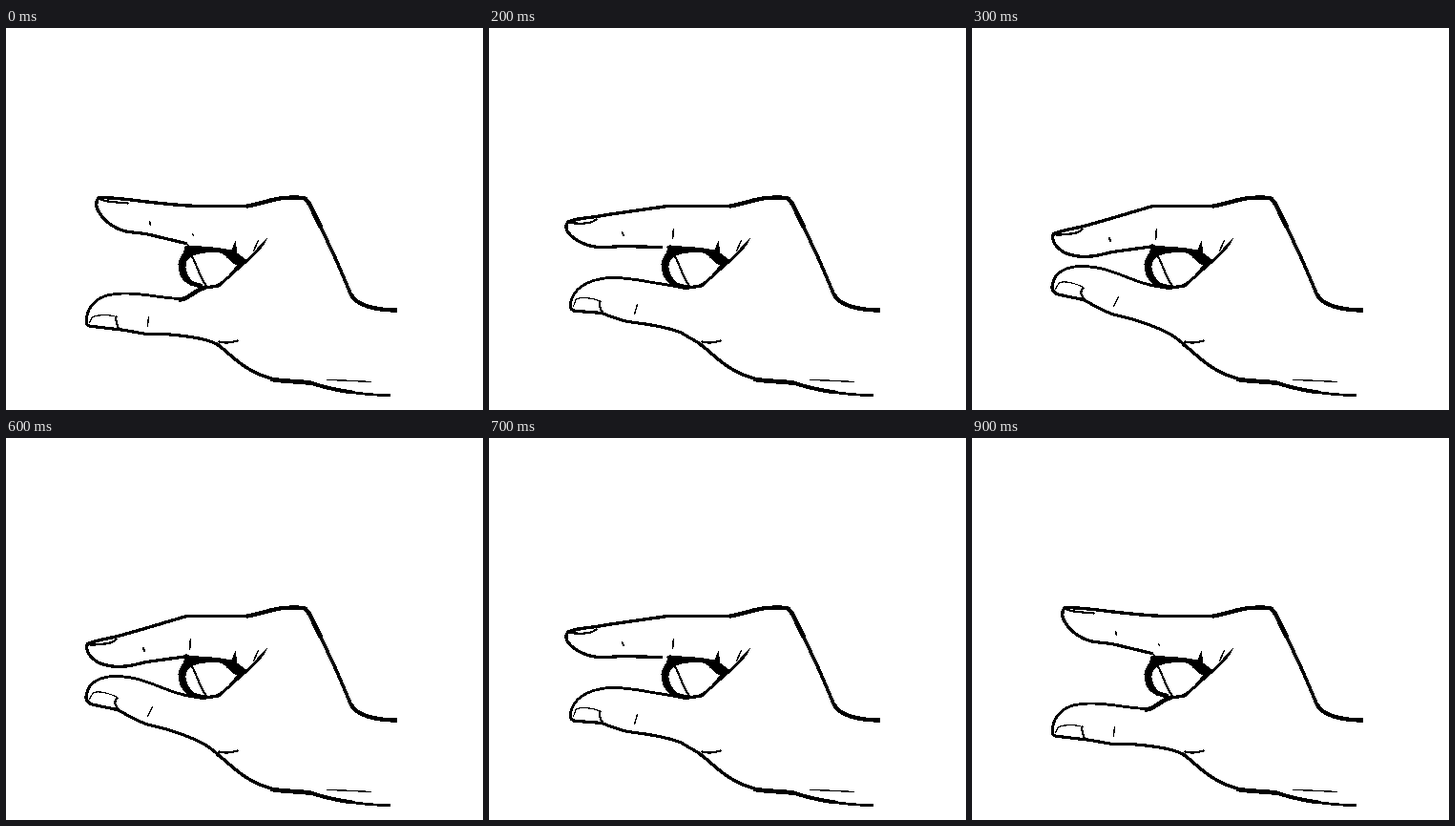
Recreate the animation shown at these times as an HTML page. Size 500 by 400 pixels, loop 1000 ms.

```html
<!DOCTYPE html>
<html lang="en">
<head>
<meta charset="utf-8">
<title>Pinching hand</title>
<style>
  html, body { margin: 0; width: 100%; height: 100%; overflow: hidden; background: #fff; }
  svg { display: block; }
  .line { fill: none; stroke: #000; stroke-linecap: round; stroke-linejoin: round; }
</style>
</head>
<body>
<svg width="500" height="400" viewBox="0 0 500 400" shape-rendering="crispEdges">
  <rect width="500" height="400" fill="#fff"/>
  <g transform="translate(.5 .5)">
    <!-- back of the hand and wrist -->
    <g class="line">
      <path stroke-width="3.400" d="M204 186.300L252 186"/>
      <path stroke-width="4.400" d="M252 186C266 184 276 179 290 177.500C299 177 307 176.500 313 178"/>
      <path stroke-width="4.600" d="M313 178.500C318 182 320 189 323 195L329 207"/>
      <path stroke-width="3.600" d="M329 207L345 241L357 269C360 276 361 281 367 285"/>
      <path stroke-width="4.400" stroke-linecap="butt" d="M361 278C366 290 387 295 409 295"/>
      <path stroke-width="3.500" d="M221 331C235 340 246 358 279 367"/>
      <path stroke-width="4.800" d="M279 367.500C292 370 306 369 320 371.500"/>
      <path stroke-width="4" d="M320 371.500C334 376 348 379 362 381"/>
      <path stroke-width="2.800" d="M362 381C376 383 390 384 401 384"/>
      <path stroke-width="1.400" d="M336 368L353 368.500L382 370"/>
      <path stroke-width="2.300" d="M223 328C230 330 236 329 242 327"/>
    </g>

    <!-- gap between the fingers -->
    <path d="M187 228C202 227 222 229 236 232L240 222L242 235L251 242C260 235 266 225 274 219C269 231 258 240 250 247L242 254L223 271C214 273 201 273 193 269C184 264 180 256 180 247C180 240 187 236 187 228Z"/>
    <path fill="#fff" d="M188 250C187 241 195 236 208 235C220 233 228 235 231 240L238 246L241 248C235 257 230 262 220 268L206 270C195 268 189 260 188 250Z"/>
    <path d="M228 235L238 236L250 244L244 248L238 245Z"/>
    <g class="line">
      <path stroke-width="2.200" d="M194 238C198 243 200 255 209 269"/>
      <path stroke-width="1.500" d="M264 222L259 233"/>
    </g>

    <g id="fingers" class="line"></g>
  </g>
</svg>
<script>
const widths = {
  top: 3.4, tip: 3.3, nail: 2.2, crease: 1.9, knuckle: 1.7,
  thumbTop: 2.9, thumbTip: 3.2, thumbNail: 1.2, nailSide: 2.2, thumbCrease: 1.4, web: 4.6
};

const open = {
  top: 'M97 177C107 177 116 178 127 179C150 182 168 184 190 185.5L206 186.3',
  tip: 'M97 177C92 182 94 188 98 194C104 203 115 211 128 213L146 215L188 225',
  nail: 'M99 179C104 182 118 182 127 183',
  crease: 'M150 202L151 206',
  knuckle: 'M195 215L196 217M190 226L192 230',
  thumbTop: 'M84 303C86 289 97 279 115 278C138 275 160 283 184 283L186 284',
  thumbTip: 'M84 303C83 310 85 312 90 312L116 315C127 316 138 319 148 320C170 319 198 323 212 327L222 331',
  thumbNail: 'M87 308L90 302C98 299 106 300 113 301',
  nailSide: 'M115 302C114 306 116 310 117 313',
  thumbCrease: 'M149 302L148 312',
  web: 'M184 257C187 264 194 268 203 269M182 284C192 283 195 275 209 271'
};

const half = {
  top: 'M82 203C86 200 96 199 112 197C135 193 160 190 187 186L206 186.3',
  tip: 'M82 203C78 208 82 215 89 220C99 227 111 230 124 229L138 228L180 229',
  nail: 'M84 203C92 205 106 205 112 200',
  crease: 'M139 214L141 217',
  knuckle: 'M193 210L192 220M186 229L190 227',
  thumbTop: 'M85 288C87 273 102 263 125 261C147 260 166 266 184 268L205 272',
  thumbTip: 'M85 288C84 294 87 296 92 296L118 298C130 303 141 307 152 308C170 310 186 313 200 318L222 331',
  thumbNail: 'M88 291L91 283C99 281 107 282 115 285',
  nailSide: 'M116 286C115 290 116 294 119 298',
  thumbCrease: 'M155 289L152 299',
  web: 'M184 257C187 264 194 269 203 270M205 271C206 271 208 271 209 271'
};

const near = {
  top: 'M85 215C91 212 104 210 117 207C146 199 168 192 189 186L206 186.3',
  tip: 'M85 215C82 222 88 230 97 235C107 239 121 240 134 237L147 234L190 228',
  nail: 'M88 216C97 216 113 215 115 210',
  crease: 'M143 219L145 223',
  knuckle: 'M193 210L192 221M188 226L192 229',
  thumbTop: 'M84 268C86 256 97 250 112 249C145 248 163 265 193 270L205 272',
  thumbTip: 'M84 268C82 274 86 278 92 279L116 284C128 290 138 297 150 300C174 305 200 315 212 323L222 331',
  thumbNail: 'M87 273L91 266C99 264 108 267 116 271',
  nailSide: 'M116 272C112 276 114 279 117 283',
  thumbCrease: 'M153 281L148 291',
  web: half.web
};

// Only the index finger bends further; the thumb stays put.
const closed = {
  ...near,
  top: 'M81 230C91 223 103 217 117 211C140 201 158 191 174 185L206 186.3',
  tip: 'M81 230C78 236 82 241 88 244C97 248 108 249 117 247C125 245 132 238 143 235L186 225',
  nail: 'M84 231C92 228 105 226 109 219',
  crease: 'M139 223L141 227',
  knuckle: 'M193 210L192 220M185 225L192 229'
};

function mix(a, b, k) {
  const pose = {};
  for (const part in a) {
    const to = b[part].match(/[\d.]+/g);
    let i = 0;
    pose[part] = a[part].replace(/[\d.]+/g, n => +n + (to[i++] - n) * k);
  }
  return pose;
}

const poses = [open, mix(open, half, 0.5), half, near, closed];
const order = [0, 1, 2, 3, 4, 4, 3, 2, 1, 0];
const STEP = 100;

const group = document.getElementById('fingers');
const paths = {};
for (const part in widths) {
  const path = document.createElementNS(group.namespaceURI, 'path');
  path.setAttribute('stroke-width', widths[part]);
  paths[part] = group.appendChild(path);
}

let shown = -1;
function draw() {
  const index = order[Math.floor(performance.now() / STEP) % order.length];
  if (index !== shown) {
    shown = index;
    for (const part in paths) paths[part].setAttribute('d', poses[index][part]);
  }
  requestAnimationFrame(draw);
}
draw();
</script>
</body>
</html>
```
